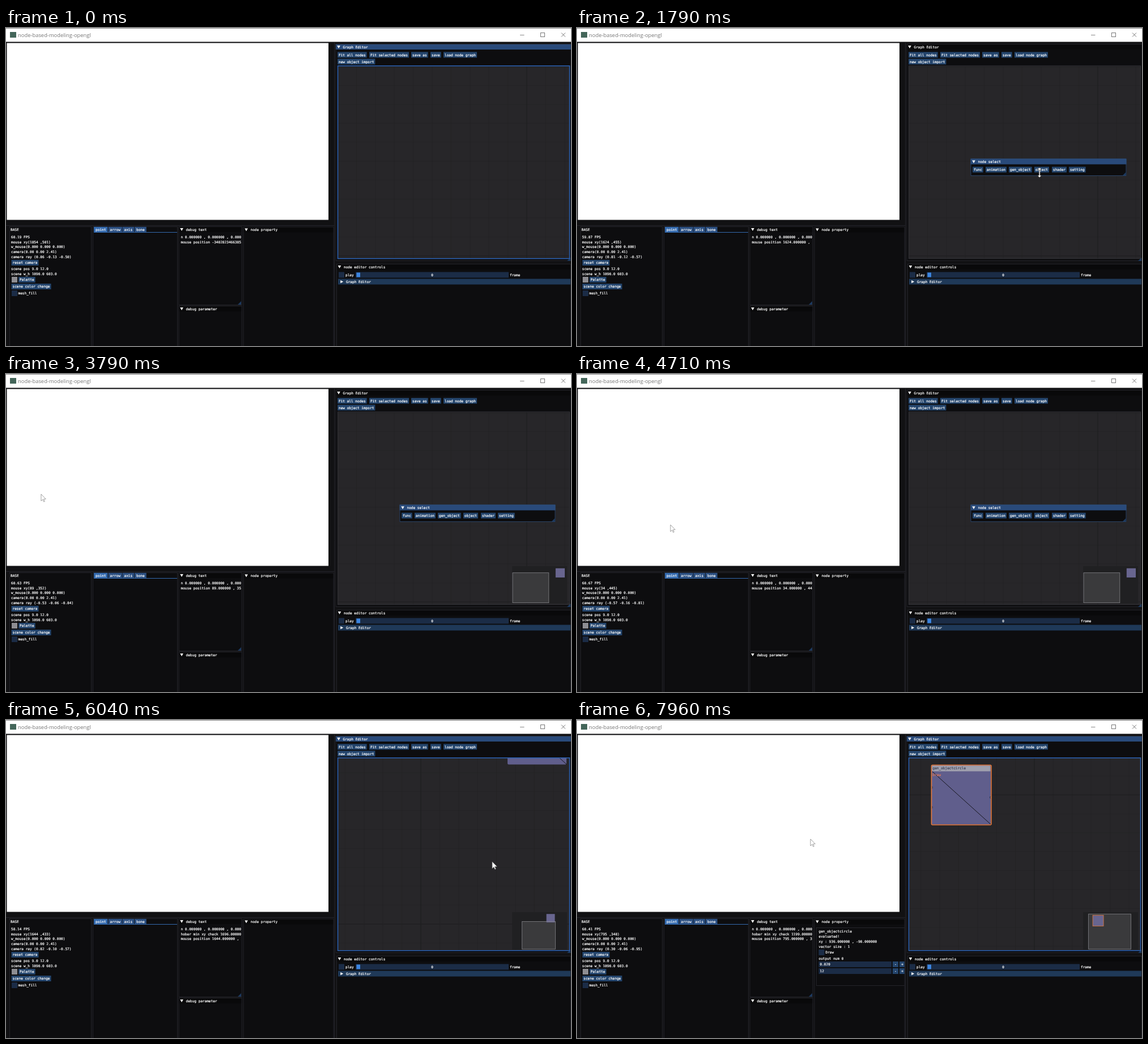
Animation of 997x561 px, one loop 8000 ms. Source, as an HTML page with a canvas:

```html
<!DOCTYPE html>
<html lang="en">
<head>
<meta charset="utf-8">
<title>node-based-modeling-opengl</title>
<style>
  html, body { margin: 0; width: 100%; height: 100%; overflow: hidden; background: #111113; }
  canvas { display: block; }
</style>
</head>
<body>
<canvas id="stage" width="997" height="561"></canvas>
<script>
const ctx = document.getElementById('stage').getContext('2d');
const LOOP = 8000, FRAME_TIME = 1000 / 24;
const UI_FONT = '6.1px "DejaVu Sans Mono", monospace';
const BLUE = '#294a7a', BUTTON = '#24456d', FRAME = '#1b2c46', PANEL = '#0d0d0f', EDGE = '#2a2a31';
const ORANGE = '#e67a3c', NODE = '#605e8c', WHITE = '#fff';

// Moments at which the interface changes, in ms
const POPUP_OPEN = 1200, NODE_ADDED = 2850, POPUP_CLOSE = 5200, NODE_SELECTED = 7000;
// The readouts trail the pointer by two frames
const INPUT_LAG = 2 * FRAME_TIME;

// Each track is a list of [time, ...values], joined linearly
const cursorTrack = [
  [-70, 967.3, 285.6], [250, 967.3, 285.6], [900, 847.5, 261.7], [1720, 847.5, 261.7],
  [1792, 816, 255], [1950, 784, 251], [3350, 784, 251], [3708, 47.6, 208], [3792, 62, 212],
  [3900, 60, 230], [4200, 19, 256.4], [4640, 19, 256.4], [4708, 164, 266], [4950, 850, 270],
  [5400, 975, 300], [5950, 858, 250], [6060, 858, 250], [6250, 640, 290], [6420, 733, 100],
  [6620, 691.6, 166], [7000, 691.6, 166], [7400, 440, 190], [7875, 415.5, 205.9], [7958, 412, 210]
];
const panTrack = [
  [5400, 0, 0], [5950, -187, -42], [6060, -187, -42], [6250, -405, -2], [6420, -405, -2], [6620, -446, 64]
];
const fpsTrack = [
  [0, 60.19], [1792, 59.87], [3792, 60.63], [4708, 60.67], [6042, 58.14], [6708, 60.22], [7958, 60.41]
];

function sample(track, t) {
  const next = track.findIndex(key => key[0] > t);
  if (next === 0) return track[0].slice(1);
  if (next < 0) return track[track.length - 1].slice(1);
  const a = track[next - 1], b = track[next], f = (t - a[0]) / (b[0] - a[0]);
  return a.slice(1).map((v, i) => v + (b[i + 1] - v) * f);
}

function rect(x, y, w, h, color) {
  ctx.fillStyle = color;
  ctx.fillRect(x, y, w, h);
}
function outline(x, y, w, h, color, width = 1) {
  ctx.strokeStyle = color;
  ctx.lineWidth = width;
  ctx.strokeRect(x, y, w, h);
}
function line(x1, y1, x2, y2, color, width = 1) {
  ctx.strokeStyle = color;
  ctx.lineWidth = width;
  ctx.beginPath();
  ctx.moveTo(x1, y1);
  ctx.lineTo(x2, y2);
  ctx.stroke();
}
function shape(points, fill, stroke, width = 1) {
  ctx.beginPath();
  points.forEach(([x, y]) => ctx.lineTo(x, y));
  ctx.closePath();
  ctx.fillStyle = fill;
  ctx.fill();
  if (stroke) {
    ctx.strokeStyle = stroke;
    ctx.lineWidth = width;
    ctx.stroke();
  }
}
// Text is placed by its left edge and the middle of its row; a hairline stroke firms up the small type
function label(text, x, y, color = WHITE) {
  ctx.font = UI_FONT;
  ctx.fillStyle = ctx.strokeStyle = color;
  ctx.lineWidth = .2;
  ctx.fillText(text, x, y + 2.2);
  ctx.strokeText(text, x, y + 2.2);
}
function rows(lines, x, y) {
  lines.forEach((text, i) => label(text, x, y + i * 8.9));
}
function button(text, x, y, color = BUTTON, padding = 2) {
  ctx.font = UI_FONT;
  rect(x, y - 5, ctx.measureText(text).width + 2 * padding, 10, color);
  label(text, x + padding, y);
}
function openArrow(x, y) {
  shape([[x - 2.8, y - 2.2], [x + 2.8, y - 2.2], [x, y + 2.8]], WHITE);
}
function grip(x, y) {
  shape([[x, y], [x, y - 6], [x - 6, y]], '#1d3a60');
}
function panel(x, y, w, h, title, color = '#09090a', edge = EDGE) {
  rect(x, y, w, h, PANEL);
  if (title) {
    rect(x, y, w, 10, color);
    openArrow(x + 5.5, y + 5.2);
    label(title, x + 13, y + 5.4);
  }
  outline(x + .5, y + .5, w - 1, h - 1, edge, .8);
}
function clipped(x, y, w, h, draw) {
  ctx.save();
  ctx.beginPath();
  ctx.rect(x, y, w, h);
  ctx.clip();
  draw();
  ctx.restore();
}

function drawWindowFrame() {
  rect(0, 0, 997, 561, '#111113');
  rect(0, 0, 997, 24.4, '#fff');
  rect(0, 0, 997, 1, '#8a8a8a');
  rect(7, 7, 11, 10, '#44665a');
  ctx.font = '9.4px "Open Sans", sans-serif';
  ctx.fillStyle = '#777';
  ctx.fillText('node-based-modeling-opengl', 21, 16.4);
  line(907, 12.5, 914.5, 12.5, '#888');
  outline(943.5, 8.5, 7, 7, '#777');
  line(980, 8.5, 987, 15.5, '#777');
  line(987, 8.5, 980, 15.5, '#777');
  rect(1.5, 26.5, 567.5, 312, '#fff');
  line(0, 348.5, 579, 348.5, EDGE, .8);
  line(579.5, 26, 579.5, 561, EDGE, .8);
}

function drawBase(t, mouse) {
  panel(6, 350, 145, 215);
  label('BASE', 8, 355.8);
  const dx = (mouse.x - 562) * .00133, dy = (300 - mouse.y) * .00133, len = Math.hypot(dx, dy, 1);
  const ray = [dx, dy, -1].map(v => (v / len).toFixed(2)).join(' ');
  rows([
    sample(fpsTrack, t)[0].toFixed(2) + ' FPS',
    `mouse xy(${mouse.x} ,${mouse.y})`,
    'w_mouse(0.000 0.000 0.000)',
    'camera(0.00 0.00 2.41)',
    `camera ray (${ray})`
  ], 9, 368.4);
  button('reset camera', 9.5, 414);
  rows(['scene pos 9.0 12.0', 'scene w_h 1090.0 603.0'], 9, 425);
  rect(10, 439, 10, 10, '#8d8d92');
  button('Palette', 22, 444);
  button('scene color change', 9.5, 456);
  rect(10, 463, 10, 10, FRAME);
  label('mesh_fill', 21.5, 468);
}

function drawTabs() {
  panel(153, 350, 150, 215);
  [['point', 155], ['arrow', 180.5], ['axis', 205.5], ['bone', 227]].forEach(([text, x], i) =>
    button(text, x, 355.8, i ? '#2a4e80' : '#3369ad', 3));
  line(155, 360.5, 302, 360.5, '#3369ad');
}

function drawDebug(t, mouse, node) {
  panel(304.5, 350, 112, 139, 'debug text');
  panel(304.5, 490, 112, 75, 'debug parameter');
  grip(415, 488);
  const lines = ['n 0.000000 , 0.000000 , 0.000000'];
  if (t >= NODE_ADDED && node.x < 995)
    lines.push(`hober min xy check ${Math.round((node.x - 1.2) / .5211)}.000000`);
  lines.push('mouse position ' + (t < 200 ? '-340282346638528'
    : `${mouse.x}.000000 , ${mouse.y}.000000`));
  clipped(305, 350, 110, 139, () => rows(lines, 308.5, 368.4));
}

function drawProperty(t) {
  panel(418.5, 350.5, 160, 215, 'node property');
  if (t < NODE_SELECTED) return;
  clipped(419, 360, 159, 112, () => {
    outline(422.5, 366.5, 170, 102, EDGE, .8);
    rows(['gen_objectcircle', 'evaluated!', 'xy : 936.000000 , -98.000000', 'vector size : 1'], 426.5, 373.2);
    rect(426.5, 405, 10, 10, FRAME);
    label('Draw', 438.5, 410);
    label('output num 0', 426.5, 421);
    [['0.020', 431], ['12', 443]].forEach(([value, y]) => {
      rect(426.5, y - 5, 128.5, 10, FRAME);
      label(value, 428.5, y);
      [['-', 557], ['+', 569]].forEach(([sign, x]) => {
        rect(x, y - 5, 10, 10, BUTTON);
        label(sign, x + 3.2, y);
      });
    });
  });
}

function drawGrid(pan) {
  const step = 33.4, first = (origin, start) => Math.ceil((start - origin) / step);
  const ox = 919 + pan.x, oy = 402 + pan.y;
  const color = n => n % 10 ? 'rgba(24,24,26,.14)' : '#1d1d1f';
  for (let n = first(ox, 585); ox + n * step < 995; n++)
    line(ox + n * step, 67, ox + n * step, 407, color(n));
  for (let n = first(oy, 67); oy + n * step < 407; n++)
    line(585, oy + n * step, 995, oy + n * step, color(n));
}

function drawNode({ x, y }, selected) {
  ctx.beginPath();
  ctx.roundRect(x, y, 104, 104.5, 2);
  ctx.fillStyle = NODE;
  ctx.fill();
  rect(x + .5, y + .5, 103, 10, '#a0a0ae');
  line(x + 1, y + 11, x + 104, y + 104, '#15151c');
  label('gen_objectcircle', x + 1.5, y + 5, '#3d4257');
  label('Draw', x + 1.5, y + 16.5, '#e0795a');
  [[0, 39], [0, 74], [104, 56.5]].forEach(([px, py]) => {
    rect(x + px - 1.5, y + py - 1.5, 3, 3, '#20242e');
    rect(x + px - .7, y + py - .7, 1.4, 1.4, '#8aa0c0');
  });
  if (selected) {
    ctx.beginPath();
    ctx.roundRect(x - .5, y - .5, 105.5, 105.5, 2);
    ctx.strokeStyle = ORANGE;
    ctx.lineWidth = 1.6;
    ctx.stroke();
  }
}

// The overview fits both the visible area and the node into its corner box
function drawMinimap(node, selected) {
  rect(893, 339, 97, 66, '#202022');
  const left = Math.min(585, node.x), right = Math.max(995, node.x + 104);
  const top = Math.min(67, node.y), bottom = Math.max(407, node.y + 104);
  const scale = Math.min(92 / (right - left), 62 / (bottom - top));
  const mapX = x => 940 + (x - (left + right) / 2) * scale;
  const mapY = y => 373.2 + (y - (top + bottom) / 2) * scale;
  const view = [mapX(585), mapY(67), 410 * scale, 340 * scale];
  rect(...view, '#3a3a3c');
  const box = [mapX(node.x), mapY(node.y), 104 * scale, 104 * scale];
  rect(...box, '#68658f');
  if (selected) outline(...box, ORANGE, .8);
  outline(...view, '#85858a', .8);
}

function drawGraphEditor(t, pan, node) {
  const focused = t < POPUP_OPEN || t >= POPUP_CLOSE;
  const selected = t >= NODE_SELECTED;
  panel(581.5, 28, 416, 383, 'Graph Editor', focused ? BLUE : undefined);
  [['Fit all nodes', 585], ['Fit selected nodes', 641], ['save as', 715], ['save', 749], ['load node graph', 772]]
    .forEach(([text, x]) => button(text, x, 47.3));
  button('new object import', 585, 59.3);
  grip(996, 411);
  rect(585, 67, 410, 340, '#272629');
  clipped(585, 67, 410, 340, () => {
    drawGrid(pan);
    if (t >= NODE_ADDED) {
      drawNode(node, selected);
      drawMinimap(node, selected);
    }
  });
  outline(585.5, 66.8, 409, 340, focused ? '#2b62b4' : '#38383e', focused ? 1.5 : .8);
}

function drawControls() {
  panel(583, 416, 414, 149, 'node editor controls');
  rect(587, 430.5, 10, 10, FRAME);
  label('play', 599, 435.7);
  rect(617, 430.5, 270, 10, FRAME);
  rect(618.5, 431.5, 6.5, 8, '#3d85e0');
  label('0', 750.2, 435.7);
  label('frame', 889, 435.7);
  rect(586, 442.5, 410, 10, '#1f3958');
  shape([[590.2, 445], [595.2, 447.6], [590.2, 450.2]], WHITE);
  label('Graph Editor', 600, 447.7);
}

function drawPopup() {
  panel(694.5, 230.5, 275, 30.5, 'node select', BLUE, '#34527c');
  [['func', 698], ['animation', 721], ['gen_object', 762], ['object', 807], ['shader', 838], ['setting', 868]]
    .forEach(([text, x]) => button(text, x, 249.8));
  grip(968.5, 260.5);
}

function drawCursor(t, x, y) {
  const move = ([px, py]) => [x + px, y + py];
  if (t >= POPUP_OPEN && t < 1850) {
    const half = [[0, -9], [3.5, -5], [1, -5], [1, 5], [3.5, 5], [0, 9]];
    const mirrored = half.slice(1, -1).reverse().map(([px, py]) => [-px, py]);
    shape([...half, ...mirrored].map(move), '#fff', '#222', .6);
  } else {
    shape([[0, 0], [0, 12], [2.8, 9.4], [4.8, 13.5], [6.4, 12.7], [4.5, 8.8], [8.3, 8.6]].map(move),
      '#fff', '#777', .7);
  }
}

function draw(t) {
  const [cx, cy] = sample(cursorTrack, t);
  const [px, py] = sample(cursorTrack, t - INPUT_LAG);
  const mouse = { x: Math.round((px - 1.2) / .5211), y: Math.round((py - 24.6) / .521) };
  const [panX, panY] = sample(panTrack, t);
  const pan = { x: panX, y: panY }, node = { x: 1072 + panX, y: 16 + panY };

  drawWindowFrame();
  drawBase(t, mouse);
  drawTabs();
  drawDebug(t, mouse, node);
  drawProperty(t);
  drawGraphEditor(t, pan, node);
  drawControls();
  if (t >= POPUP_OPEN && t < POPUP_CLOSE) drawPopup();
  if (t >= 200) drawCursor(t, cx, cy);
}

const start = performance.now();
function tick() {
  const t = (performance.now() - start) % LOOP;
  draw(Math.floor((t + 5) / FRAME_TIME) * FRAME_TIME);
  requestAnimationFrame(tick);
}
tick();
</script>
</body>
</html>
```
